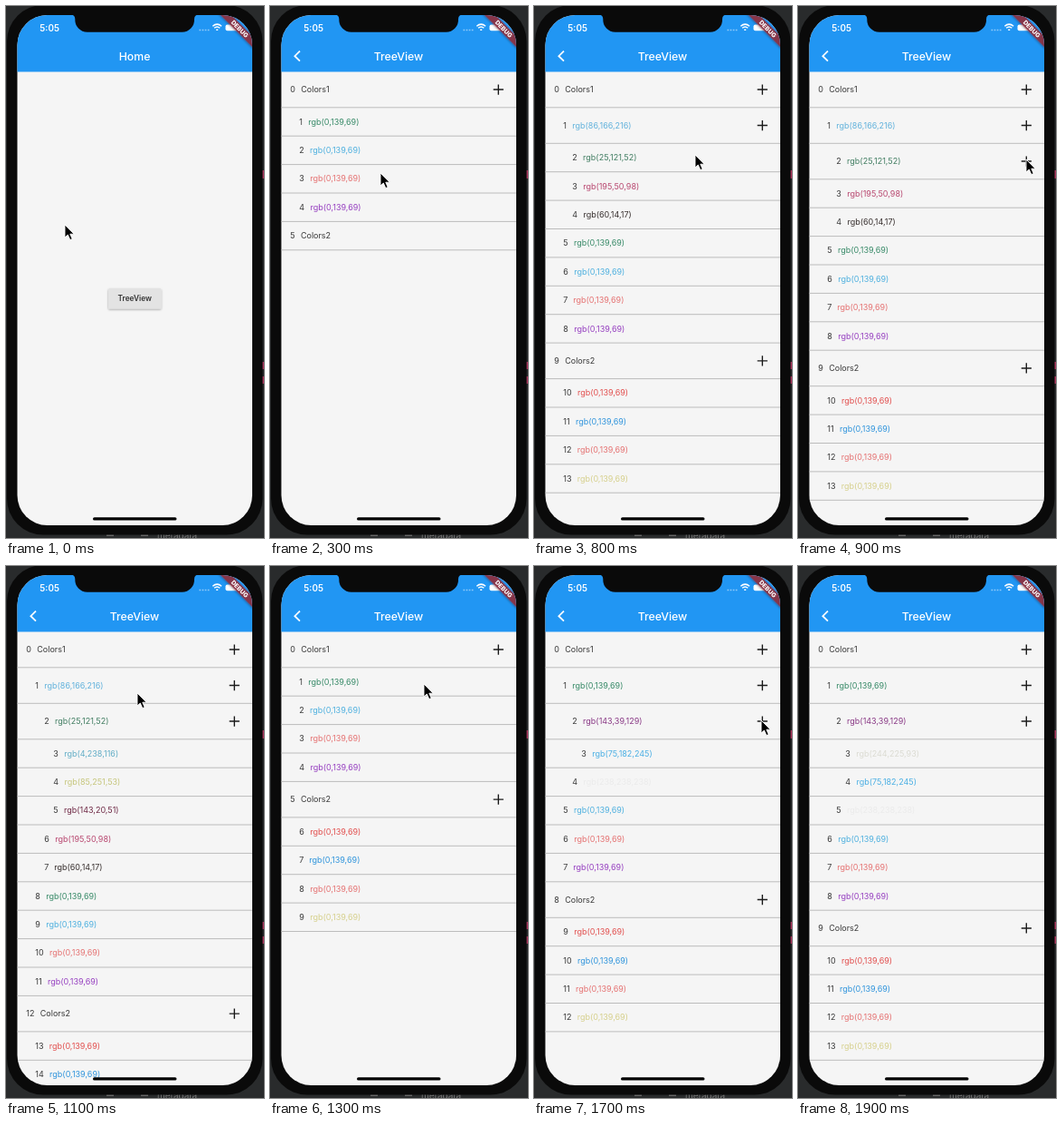
Animation, 285 px wide and 586 px high, one loop 2 s. Source, as an HTML page:

```html
<!DOCTYPE html>
<html lang="en">
<head>
<meta charset="utf-8">
<title>Tree view demo</title>
<style>
  html, body { margin: 0; width: 100%; height: 100%; overflow: hidden; background: #292b2c; }
  svg { display: block; width: 285px; height: 586px; }
  text { font-family: Inter, "Open Sans", sans-serif; }
  .bold { font-weight: 600; }
  .title { font-weight: 500; font-size: 12.3px; fill: #fff; }
  .row { font-size: 9px; fill: #3a3a3a; }
  .mid { text-anchor: middle; }
  .plus { stroke: #1c1c1c; stroke-width: 1.4; }
  .rule { stroke: #bcbcbc; stroke-width: 1; }
</style>
</head>
<body>
<svg viewBox="0 0 285 586">
  <defs>
    <clipPath id="screen"><rect x="12.5" y="10" width="259.5" height="562" rx="33"/></clipPath>
    <filter id="soft" x="-20%" y="-30%" width="140%" height="180%">
      <feDropShadow dx="0" dy="1" stdDeviation="0.8" flood-opacity=".35"/>
    </filter>
  </defs>

  <!-- desktop behind the phone -->
  <rect width="285" height="586" fill="#292b2c"/>
  <path d="M283 181h2v9h-2zM283 392h2v8h-2zM283 408h2v8h-2z" fill="#a8365c"/>
  <text x="167" y="587" font-size="10" fill="#777">metadata</text>
  <path d="M111 583h8M149 583h8" stroke="#666" stroke-width="2"/>
  <rect x="1" y="-1" width="282.5" height="583.5" rx="40" fill="#0a0a0a"/>

  <g clip-path="url(#screen)">
    <rect x="12" y="10" width="261" height="563" fill="#f5f5f5"/>
    <rect x="12" y="10" width="261" height="62.5" fill="#2196f3"/>

    <g id="home">
      <rect x="113" y="311" width="58.5" height="22.5" rx="1.5" fill="#e3e3e3" filter="url(#soft)"/>
      <text class="bold mid" x="142.3" y="325.4" font-size="8.3" fill="#333">TreeView</text>
    </g>
    <g id="tree"></g>

    <path id="back" d="M33 49.7L27.4 55.2L33 60.7" fill="none" stroke="#fff" stroke-width="1.8"/>
    <text id="title" class="title mid" x="142" y="59.5"></text>

    <!-- status bar -->
    <text class="bold" x="37.3" y="27.8" font-size="9.8" fill="#fff">5:05</text>
    <path d="M213.5 26.5h11" stroke="#fff" stroke-opacity=".5" stroke-width="1.4" stroke-dasharray="1.7 1.4"/>
    <g fill="none" stroke="#fff" stroke-width="1.5">
      <path d="M228.3 22.2q4.9-4.2 9.8 0M230.1 24.3q3.1-2.6 6.2 0"/>
      <path d="M232.2 26.2h2"/>
    </g>
    <rect x="242.5" y="20.5" width="14" height="6.8" rx="2" fill="#fff"/>

    <!-- debug ribbon -->
    <g transform="translate(258.2 25.2) rotate(45)">
      <rect x="-34" y="-4.3" width="68" height="8.6" fill="#8e2f42" fill-opacity=".92" filter="url(#soft)"/>
      <text class="mid" y="2.4" font-size="6.8" font-weight="800" fill="#fff">DEBUG</text>
    </g>
    <rect x="96" y="563.2" width="92.5" height="3.4" rx="1.7"/>
  </g>
  <path d="M72 9.5q4.3 .5 4.3 5a13.5 13.5 0 0 0 13.5 14.3h104.7a13.5 13.5 0 0 0 13.5-14.3q0-4.5 4.3-5z" fill="#0a0a0a"/>

  <path id="cursor" d="M0 0V14L3.3 11L5.8 16.6L8.2 15.6L5.8 10.2H10.2Z"
        stroke="#fff" stroke-width=".9"/>
</svg>

<script>
const STEP = 100, LOOP = 2000;
const TOP = 72.3, LEAF = 31.4, OPEN = 39.5;

// key: [depth, label, colour]
const item = (depth, rgb, colour = `rgb(${rgb})`) => [depth, `rgb(${rgb})`, colour];
const base = colour => item(1, "0,139,69", colour);
const nodes = {
  A: [0, "Colors1", "#3a3a3a"],
  a: base("#388a68"), b: base("#4fb0df"), c: base("#e57373"), d: base("#9640c0"),
  B: [0, "Colors2", "#3a3a3a"],
  e: base("#e2504f"), f: base("#2f94dc"), g: base("#e57373"), h: base("#d6d08c"),
  n: item(1, "86,166,216", "#62b2dc"),
  x: item(2, "25,121,52", "#447f64"), y: item(2, "195,50,98", "#b84870"), z: item(2, "60,14,17", "#38302f"),
  r: item(3, "4,238,116", "#62adc6"), s: item(3, "85,251,53", "#c6c67c"),
  t: item(3, "143,20,51", "#6f2a46"),
  p: item(2, "143,39,129", "#8a3a86"), w: item(2, "238,238,238", "#ebebeb"),
  u: item(3, "244,225,93", "#dbdbd2"), v: item(3, "75,182,245", "#4bafe4")
};

// [cursor x, cursor y, Colors1 branch, Colors2 branch]; "+" marks an open node
const second = "B+efgh";
const steps = [
  [65, 241],
  [136, 318],
  [112, 98, "A", "B"],
  [122, 184, "A+abcd", "B"],
  [112, 248, "A+abcd", second],
  [249, 92, "A+nabcd", second],
  [250, 134, "A+n+abcd", second],
  [250, 134, "A+n+yzabcd", second],
  [178, 164, "A+n+xyzabcd", second],
  [252, 169, "A+n+x+yzabcd", second],
  [252, 169, "A+n+x+styzabcd", second],
  [145, 140, "A+n+x+rstyzabcd", second],
  [140, 132, "A+nabcd", second],
  [170, 130, "A+abcd", second],
  [250, 132, "A+a+wbcd", second],
  [234, 166, "A+a+pwbcd", second],
  [250, 170, "A+a+p+wbcd", second],
  [251, 170, "A+a+p+vwbcd", second],
  [251, 170, "A+a+p+uvwbcd", second],
  [300, 170, "A+a+p+uvwbcd", second]
];

const el = id => document.getElementById(id);
const show = (id, on) => el(id).style.display = on ? "" : "none";

function treeMarkup(outline) {
  let y = TOP;
  return outline.match(/\w\+?/g).map((token, index) => {
    const [depth, label, colour] = nodes[token[0]];
    const open = token.length > 1;
    const height = open ? OPEN : LEAF;
    const mid = y + height / 2;
    y += height;
    const plus = open ? `<path class="plus" d="M246.7 ${mid}h11.2m-5.6-5.6v11.2"/>` : "";
    return `<text class="row" x="${22.3 + 10 * depth}" y="${mid + 3.1}">${index}` +
      `<tspan dx="6.3" fill="${colour}">${label}</tspan></text>${plus}` +
      `<path class="rule" d="M12 ${y}h261"/>`;
  }).join("");
}

let current = -1;
function draw(now) {
  const step = Math.floor(now % LOOP / STEP);
  if (step !== current) {
    current = step;
    const [x, y, first, last] = steps[step];
    el("cursor").setAttribute("transform", `translate(${x} ${y})`);
    el("title").textContent = first ? "TreeView" : "Home";
    el("tree").innerHTML = first ? treeMarkup(first + last) : "";
    show("home", !first);
    show("back", first);
  }
}

const start = performance.now();
function tick() {
  draw(performance.now() - start);
  requestAnimationFrame(tick);
}
tick();
</script>
</body>
</html>
```
